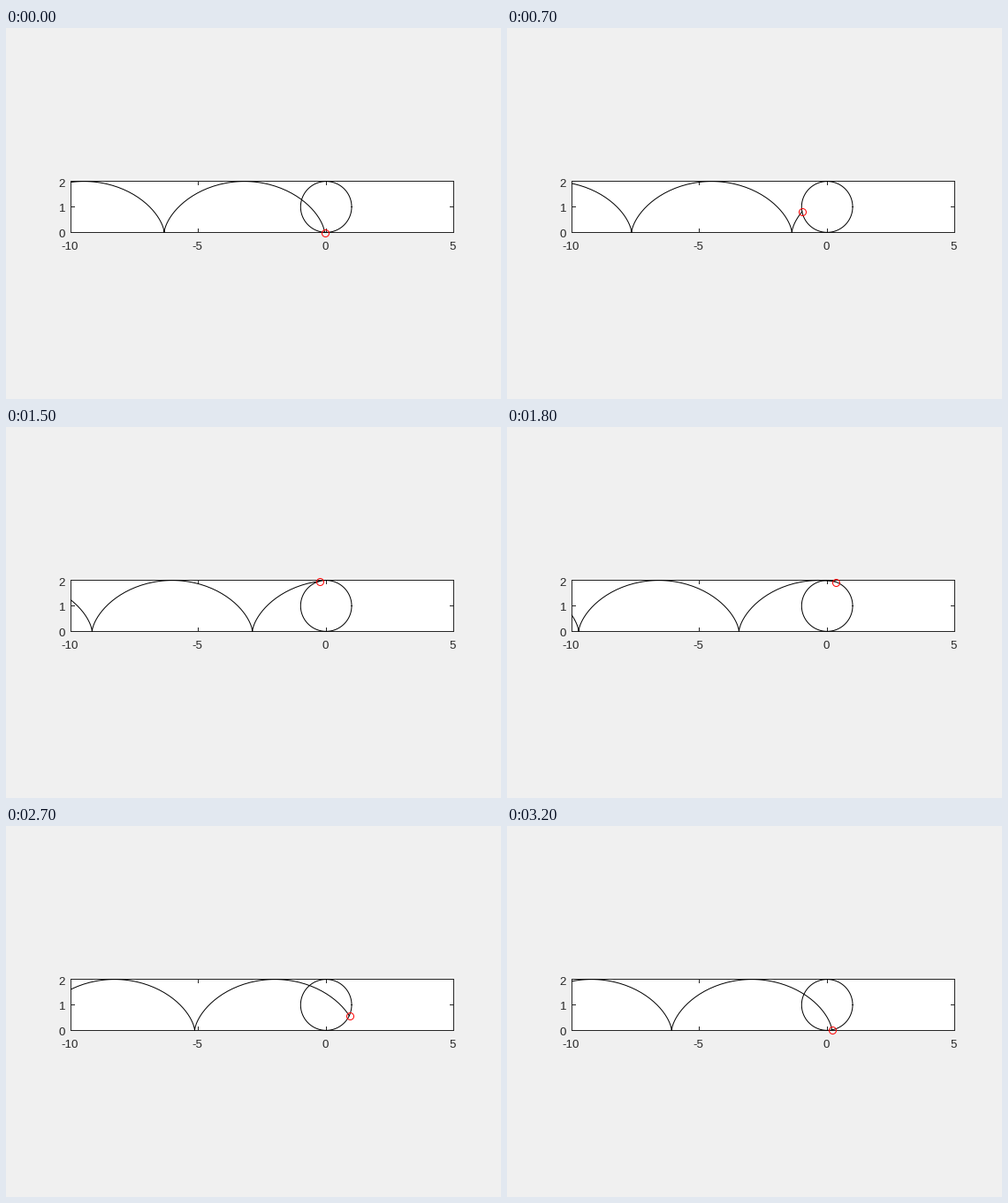
These frames come from a looping animation (560 px wide and 420 px high, 3300 ms). A matplotlib script:

```python
import numpy as np
import matplotlib.pyplot as plt
from matplotlib.animation import FuncAnimation
from matplotlib.patches import Rectangle

W, H, DPI = 560, 420, 80
FRAMES, INTERVAL = 33, 100
STEP = 0.02 * np.pi
PX = 72 / DPI  # points per pixel

LEFT, RIGHT, MIDDLE = 73.5, 506.5, 202.5
UNIT = (RIGHT - LEFT) / 15
INK = "#262626"


def sx(x):
    return LEFT + (np.asarray(x) + 10) * UNIT


def sy(y):
    return MIDDLE + (1 - np.asarray(y)) * UNIT


def pixel(v):
    """Centre of the pixel that holds v."""
    return np.floor(v) + 0.5


TOP, BOTTOM = pixel(sy(2)), pixel(sy(0))

fig = plt.figure(figsize=(W / DPI, H / DPI), dpi=DPI, facecolor="#f0f0f0")
ax = fig.add_axes([0, 0, 1, 1])
ax.set_xlim(0, W)
ax.set_ylim(H, 0)
ax.axis("off")


def rule(x0, y0, x1, y1):
    ax.plot([x0, x1], [y0, y1], color=INK, lw=PX, zorder=2,
            solid_capstyle="projecting", snap=False)


def label(x, y, text, ha):
    ax.text(x, y, text, family="Liberation Sans", size=13.33 * PX,
            color=INK, ha=ha, va="baseline")


# Plot area, box and ticks
ax.add_patch(Rectangle((LEFT, TOP), RIGHT - LEFT, BOTTOM - TOP,
                       fc="white", ec="none", zorder=1, snap=False))
for y in (TOP, BOTTOM):
    rule(LEFT, y, RIGHT, y)
for x in (LEFT, RIGHT):
    rule(x, TOP, x, BOTTOM)

TICK = 4
for v in (-10, -5, 0, 5):
    x = pixel(sx(v))
    rule(x, BOTTOM, x, BOTTOM - TICK)
    rule(x, TOP, x, TOP + TICK)
    label(sx(v) - 1.1, 251, str(v), "center")
for v in (0, 1, 2):
    y = pixel(sy(v))
    rule(LEFT, y, LEFT + TICK, y)
    rule(RIGHT, y, RIGHT - TICK, y)
    label(59.8, sy(v) + 5.9, str(v), "left")

# Rolling wheel, its trace and the rim point
clip = Rectangle((LEFT - 0.5, TOP - 0.5), RIGHT - LEFT + 1, BOTTOM - TOP + 1,
                 transform=ax.transData)
a = np.linspace(0, 2 * np.pi, 101)
wheel, = ax.plot(sx(np.cos(a)), sy(1 + np.sin(a)), "k", lw=PX, zorder=3)
trace, = ax.plot([], [], "k", lw=PX, zorder=3)
for line in (wheel, trace):
    line.set_clip_path(clip)
point, = ax.plot([], [], "o", ms=8 * PX, mew=PX, mfc="none", mec="red",
                 zorder=4, clip_on=False, snap=False)


def update(i):
    theta = STEP * (1 + 3 * i)
    phi = theta - STEP * np.arange(201)
    x, y = sx(phi - theta - np.sin(phi)), sy(1 - np.cos(phi))
    trace.set_data(x, y)
    point.set_data(pixel(x[:1]), pixel(y[:1]))
    return trace, point


anim = FuncAnimation(fig, update, frames=FRAMES, interval=INTERVAL,
                     repeat=True, repeat_delay=0)
plt.show()
```
